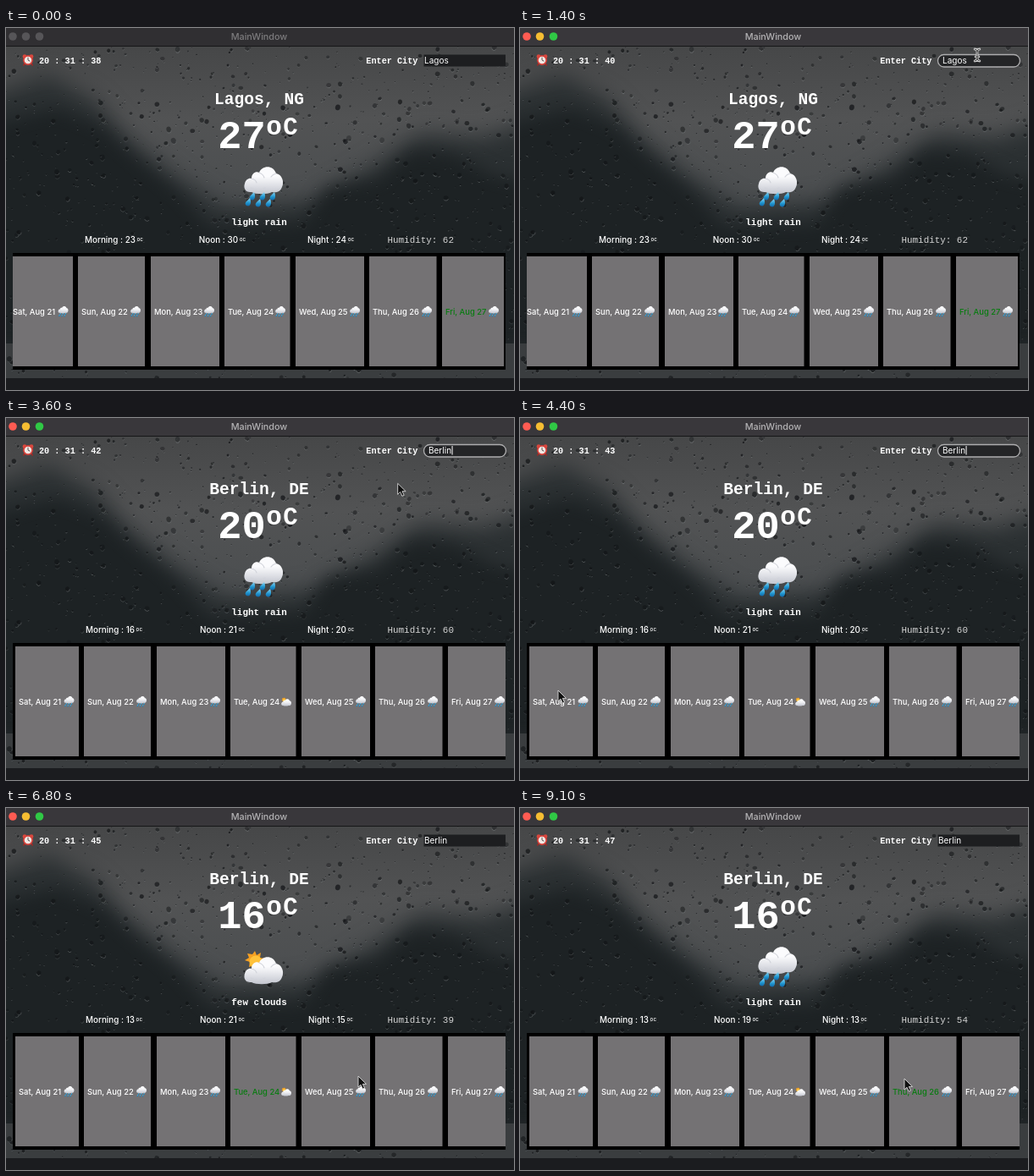
An HTML page with a canvas that plays this animation: 600x428 px, repeating every 9200 ms.

```html
<!DOCTYPE html>
<html lang="en">
<head>
<meta charset="utf-8">
<title>MainWindow</title>
<style>
  html, body { margin: 0; width: 100%; height: 100%; overflow: hidden; background: #1b1c1f; }
  canvas, svg { position: absolute; left: 0; top: 0; width: 600px; height: 428px; }
  text { fill: #fff; font: 500 9.9px Inter, "Open Sans", sans-serif; white-space: pre; }
  .mono { font: 700 10.2px "Liberation Mono", "DejaVu Sans Mono", monospace; }
  .mid { text-anchor: middle; }
  #title { font-size: 10.8px; fill: #b4b3b5; }
  #bar { fill: #39373b; }
  .idle #bar { fill: #302f32; }
  .idle #title { fill: #7d7c7e; }
  .idle #lights circle { fill: #565558; }
  #field { fill: #1d1e20; }
  .focus #field { fill: #242527; stroke: #adadae; stroke-width: 1.3; }
  .card { fill: #747274; }
  .day { font-size: 9.4px; }
  .day.on { fill: #087c10; }
</style>
</head>
<body>
<canvas id="rain" width="600" height="428"></canvas>
<svg id="app" viewBox="0 0 600 428">
  <defs>
    <linearGradient id="puff" x1="0" y1="0" x2="0" y2="1">
      <stop offset=".35" stop-color="#fbfbfd"/><stop offset="1" stop-color="#c3c6cf"/>
    </linearGradient>
    <linearGradient id="drop" x1="0" y1="0" x2="0" y2="1">
      <stop offset="0" stop-color="#8fd8f6"/><stop offset=".6" stop-color="#1f95cf"/><stop offset="1" stop-color="#1268a8"/>
    </linearGradient>
    <clipPath id="panel"><rect x="8" y="266" width="582" height="138"/></clipPath>
    <g id="cloud">
      <path fill="url(#puff)" d="M-14 8C-21 9-24 3-22-2C-21-7-17-9-14-8C-14-15-8-17-5-15C-2-23 11-25 15-14C22-13 25-4 22 2C20 8 15 9 10 8C5 11-9 11-14 8Z"/>
      <path fill="none" stroke="#d2d4db" stroke-width="1.2" stroke-linecap="round" d="M-14-8Q-9-7-8-3M-5-15Q0-13 1-9M15-14Q11-13 9-10M-15 3Q-5 7 2 3"/>
    </g>
    <path id="tear" fill="url(#drop)" d="M2-5C4 0 3 4 0 4.500C-4 4-4 1-2-1Z"/>
    <g id="wet">
      <use href="#cloud" y="-1"/>
      <use href="#tear" x="-13" y="12"/><use href="#tear" x="-1" y="12"/><use href="#tear" x="11" y="12"/>
      <use href="#tear" x="-18" y="19"/><use href="#tear" x="-6" y="20"/><use href="#tear" x="6" y="20"/>
    </g>
    <g id="fair">
      <path fill="#f5a023" d="M-10-18l2 5 5-3-1 6 6 1-5 4 3 5-6-1-2 5-3-5-6 2 1-6-6-2 5-3-2-5 6 1Z"/>
      <circle cx="-9" cy="-5" r="7.500" fill="#ffc23a"/>
      <use href="#cloud" y="11"/>
    </g>
    <path id="arrow" d="M0 0V13L3 10.200L5.200 15L7.500 14L5.300 9.400H9.500Z" fill="#111" stroke="#d8d8d8" stroke-width=".9"/>
    <g id="beam" fill="none" stroke-linecap="round">
      <path id="stem" d="M-3-7Q0-7 0-4V4Q0 7-3 7M3-7Q0-7 0-4M0 4Q0 7 3 7M-2 2H2" stroke="#ddd" stroke-width="2.400"/>
      <use href="#stem" style="stroke:#222"/>
      <path d="M-3-7Q0-7 0-4V4Q0 7-3 7M3-7Q0-7 0-4M0 4Q0 7 3 7M-2 2H2" stroke="#222" stroke-width=".8"/>
    </g>
  </defs>

  <rect id="bar" width="600" height="21"/>
  <path d="M0 21.500H600" stroke="#161618"/>
  <g id="lights">
    <circle cx="8" cy="10" r="4.800" fill="#fe5b52"/>
    <circle cx="23.500" cy="10" r="4.800" fill="#f6bd32"/>
    <circle cx="39.500" cy="10" r="4.800" fill="#30c845"/>
  </g>
  <text id="title" class="mid" x="299" y="13.500">MainWindow</text>

  <g transform="translate(26 38)">
    <path d="M-4 4L-5.500 6.500M4 4L5.500 6.500" stroke="#9d2a26" stroke-width="1.600"/>
    <circle cx="-4" cy="-4.300" r="2.400" fill="#d8483e"/><circle cx="4" cy="-4.300" r="2.400" fill="#d8483e"/>
    <circle r="5.100" fill="#f3e9e4" stroke="#d8413a" stroke-width="1.700"/>
    <path d="M0-3.300V0L2.400 1.200" fill="none" stroke="#333" stroke-width=".8"/>
  </g>
  <text id="clock" class="mono" x="39" y="41.500"></text>
  <text class="mono" x="425.300" y="41.800">Enter City</text>
  <rect id="field" x="493.500" y="31.500"/>
  <text id="entry" y="42.300" style="font-size:10px;font-weight:400"></text>
  <path id="caret" d="M0 33V43.500" stroke="#fff"/>

  <text id="city" class="mono mid" x="299" y="90" style="font-size:19.600px"></text>
  <text id="temp" class="mono mid" x="278.500" y="142" style="font-size:47px"></text>
  <text class="mono mid" x="316.500" y="126" style="font-size:31px">o</text>
  <text class="mono mid" x="336" y="126" style="font-size:29px">C</text>
  <use id="icon" x="304" y="187"/>
  <text id="sky" class="mono mid" x="299" y="233" style="font-size:10.900px"></text>
  <g id="parts"></g>
  <text id="humid" class="mono" x="450.500" y="254" style="font-size:10.900px;font-weight:400;fill:#d3d3d3"></text>

  <g clip-path="url(#panel)">
    <rect x="8" y="266" width="582" height="138"/>
    <g id="cards"></g>
  </g>
  <rect y="414" width="600" height="14" fill="#1b1c1f"/>
  <use id="mouse"/>
</svg>
<script>
const $ = id => document.getElementById(id);
const LOOP = 9200, STEP = 100;

function paintRain() {
  const g = $("rain").getContext("2d");
  let seed = 71;
  const rnd = () => (seed = (seed * 16807) % 2147483647) / 2147483647;
  const sky = g.createLinearGradient(0, 22, 0, 270);
  sky.addColorStop(0, "#464748");
  sky.addColorStop(.35, "#525354");
  sky.addColorStop(.75, "#4b4e50");
  sky.addColorStop(1, "#303537");
  g.fillStyle = sky;
  g.fillRect(0, 0, 600, 428);

  const trees = (color, blur, pts) => {
    g.filter = `blur(${blur}px)`;
    g.fillStyle = color;
    g.beginPath();
    pts.forEach(([x, y]) => g.lineTo(x, y));
    g.fill();
    g.filter = "none";
  };
  trees("#2b3032", 13, [[-40, 85], [50, 55], [105, 85], [150, 135], [200, 175], [260, 212], [360, 205], [430, 165], [490, 125], [560, 130], [640, 105], [640, 380], [-40, 380]]);
  trees("#1d2224", 10, [[-40, 120], [60, 95], [110, 115], [160, 160], [205, 195], [240, 235], [350, 232], [380, 190], [440, 180], [480, 145], [530, 150], [575, 175], [640, 185], [640, 380], [-40, 380]]);
  g.fillStyle = "#3a3d3f";
  g.fillRect(0, 373, 600, 55);

  // Each bead: dark body, pale crescent beneath.
  for (let i = 0; i < 1500; i++) {
    const x = rnd() * 600, y = 22 + rnd() * 392;
    const r = .6 + 2.4 * rnd() ** 3, tall = r * (.8 + rnd() * .5), tilt = rnd() - .5;
    g.fillStyle = `rgba(16,18,20,${.3 + rnd() * .4})`;
    g.beginPath();
    g.ellipse(x, y, r, tall, tilt, 0, 7);
    g.fill();
    g.strokeStyle = `rgba(165,170,172,${.15 + rnd() * .35})`;
    g.lineWidth = .7;
    g.beginPath();
    g.ellipse(x, y + .3, r, tall, tilt, .3, 2.6);
    g.stroke();
  }
}

// left edge, width, icon centre, label
const cards = [
  [11, 75, 74.5, "Sat, Aug 21"], [92, 79, 160, "Sun, Aug 22"], [178, 81, 247, "Mon, Aug 23"],
  [265, 77.5, 331, "Tue, Aug 24"], [349, 81, 419, "Wed, Aug 25"], [436, 79.5, 504, "Thu, Aug 26"],
  [522, 73, 583, "Fri, Aug 27"]
];
$("cards").innerHTML = cards.map(([x, w, cx, label]) =>
  `<rect class="card" x="${x}" y="270" width="${w}" height="130"/>
   <text class="day" x="${x + 4}" y="338.500">${label}</text>
   <use class="mini" transform="translate(${cx} 335) scale(.26)"/>`).join("");
const days = [...document.querySelectorAll(".day")];
const minis = [...document.querySelectorAll(".mini")];

const names = ["Morning", "Noon", "Night"];
$("parts").innerHTML = [127.5, 255.5, 383.5].map((x, i) =>
  `<text class="mid" x="${x}" y="254">${names[i]} : <tspan class="deg"></tspan> <tspan dx="-1" dy="-2.500" style="font-size:6.300px">oc</tspan></text>`).join("");
const degs = [...document.querySelectorAll(".deg")];

const report = (at, day, temp, parts, humid, sky = "light rain") => ({ at, day, temp, parts, humid, sky });
const reports = [
  report(0, 6, 27, [23, 30, 24], 62),
  report(3300, -1, 20, [16, 21, 20], 60),
  report(4600, 0, 20, [16, 21, 20], 60),
  report(5100, 1, 19, [17, 20, 17], 66),
  report(5800, 2, 17, [14, 18, 15], 64),
  report(6300, 3, 16, [13, 21, 15], 39, "few clouds"),
  report(7000, 4, 17, [13, 19, 14], 50),
  report(7700, 5, 16, [13, 19, 13], 54)
];

const typed = [[0, "Lagos"], [1500, "Lago"], [1600, "Lag"], [1700, "La"], [1800, "L"], [1900, ""],
  [2100, "B"], [2200, "Be"], [2400, "Ber"], [2600, "Berl"], [2700, "Berli"], [2800, "Berlin"]];

// time, x, y of the pointer
const path = [[100, 500, 385], [600, 535, 120], [900, 540, 32], [3400, 540, 32], [4200, 45, 322], [4600, 45, 322],
  [5000, 140, 325], [5200, 140, 325], [5600, 229, 322], [5800, 229, 322], [6200, 310, 320], [6400, 310, 320],
  [6800, 416, 317], [7100, 416, 317], [7500, 454, 320], [LOOP, 454, 320]];

const last = (list, test) => list.filter(test).pop();

function pointer(t) {
  const i = Math.max(1, path.findIndex(p => p[0] >= t));
  const [t0, x0, y0] = path[i - 1], [t1, x1, y1] = path[i];
  const k = (t - t0) / (t1 - t0), e = k * k * (3 - 2 * k);
  return [x0 + (x1 - x0) * e, y0 + (y1 - y0) * e];
}

function render(t) {
  const focus = t >= 1000 && t < 4600;
  $("app").classList.toggle("idle", t < 600);
  $("app").classList.toggle("focus", focus);
  $("field").setAttribute("width", focus ? 97 : 96.5);
  $("field").setAttribute("height", focus ? 14.5 : 14);
  $("field").setAttribute("rx", focus ? 7.2 : 0);

  $("clock").textContent = "20 : 31 : " + (38 + Math.floor((t + 700) / 1000));
  const left = focus ? 499 : 494;
  $("entry").setAttribute("x", left);
  $("entry").textContent = last(typed, s => s[0] <= t)[1];
  $("caret").setAttribute("transform", `translate(${left + 1 + $("entry").getComputedTextLength()} 0)`);
  $("caret").style.display = focus && t >= 1500 ? "" : "none";

  const r = last(reports, s => s.at <= t), berlin = t >= 3300;
  $("city").textContent = berlin ? "Berlin, DE" : "Lagos, NG";
  $("temp").textContent = r.temp;
  $("sky").textContent = r.sky;
  $("humid").textContent = "Humidity: " + r.humid;
  $("icon").setAttribute("href", r.sky === "few clouds" ? "#fair" : "#wet");
  degs.forEach((d, i) => d.textContent = r.parts[i]);
  $("cards").setAttribute("transform", `translate(${berlin ? 0 : -7} 0)`);
  days.forEach((d, i) => d.classList.toggle("on", i === r.day));
  minis.forEach((m, i) => m.setAttribute("href", berlin && i === 3 ? "#fair" : "#wet"));

  const [x, y] = pointer(t);
  $("mouse").setAttribute("href", y < 46 ? "#beam" : "#arrow");
  $("mouse").setAttribute("transform", `translate(${x} ${y})`);
  $("mouse").style.display = t < 100 ? "none" : "";
}

paintRain();
const start = performance.now();
function tick() {
  const t = (performance.now() - start) % LOOP;
  render(Math.floor(t / STEP) * STEP);
  requestAnimationFrame(tick);
}
tick();
</script>
</body>
</html>
```
